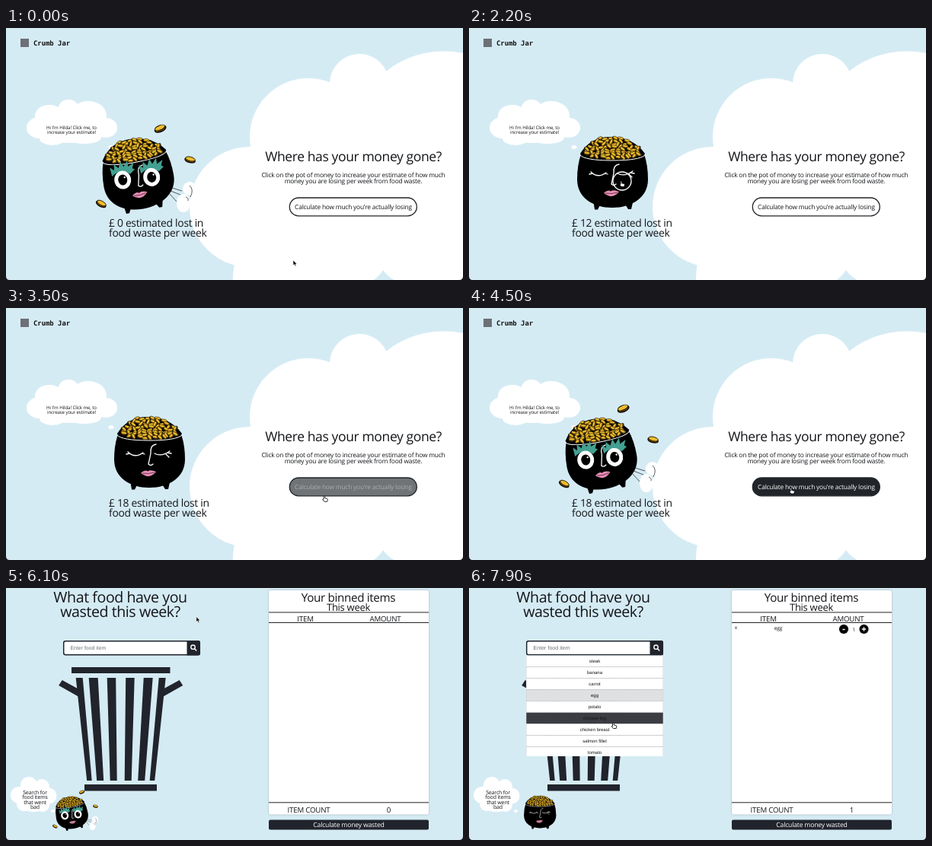
An HTML page that plays this animation: 600x331 px, repeating every 8000 ms.

```html
<!DOCTYPE html>
<html lang="en">
<head>
<meta charset="utf-8">
<title>Food waste estimate</title>
<style>
  html, body { margin: 0; width: 100%; height: 100%; overflow: hidden; background: #d5ebf4; }
  svg { display: block; width: 100vw; height: 100vh; }
  text { font-family: "Open Sans", "Noto Sans", sans-serif; fill: #14161a; letter-spacing: -.022em; text-rendering: geometricPrecision; }
  .mid { text-anchor: middle; }
  .ui text { font-family: "Liberation Sans", Arial, sans-serif; letter-spacing: 0; }
  .ink { fill: #21242c; }
  .white { fill: #fff; }
  .line { fill: none; stroke: #fff; stroke-width: 1.3; stroke-linecap: round; }
  .rule { stroke: #222; stroke-width: 1; }
  .card { filter: drop-shadow(0 .5px 1px #0004); }
</style>
</head>
<body>
<svg viewBox="0 0 600 331" preserveAspectRatio="none">
  <rect width="600" height="331" fill="#d5ebf4"/>

  <g id="home">
    <g class="white">
      <circle cx="397" cy="143" r="77"/>
      <circle cx="464" cy="73" r="39"/>
      <circle cx="575" cy="153.500" r="123"/>
      <circle cx="320" cy="235" r="79"/>
      <circle cx="390" cy="329" r="92"/>
      <path d="M330 190L400 120L600 120V331H509.500Q501 326 495 318Q490 326 482.500 331H330Z"/>
    </g>
    <rect x="19" y="14" width="11" height="11" fill="#6d7075"/>
    <text x="36" y="23.300" style="font:bold 8.9px 'DejaVu Sans Mono',monospace;letter-spacing:0;fill:#111">Crumb Jar</text>
    <g class="white">
      <ellipse cx="86" cy="130" rx="50" ry="21"/>
      <ellipse cx="44" cy="131" rx="17" ry="14"/>
      <ellipse cx="131" cy="131" rx="15" ry="13"/>
      <ellipse cx="57" cy="115" rx="19" ry="14"/>
      <ellipse cx="108" cy="115" rx="24" ry="19"/>
      <ellipse cx="82" cy="105" rx="13" ry="11"/>
      <ellipse cx="61" cy="145" rx="17" ry="9"/>
      <ellipse cx="103" cy="144" rx="22" ry="8"/>
      <ellipse cx="138" cy="156.500" rx="3.500" ry="2.500"/>
    </g>
    <g class="mid" font-size="6.200">
      <text x="86" y="132.500">Hi I'm Hilda! Click me, to</text>
      <text x="86" y="139.300">increase your estimate!</text>
    </g>
    <g font-size="13.900">
      <text id="total" x="135" y="261"></text>
      <text x="135" y="274">food waste per week</text>
    </g>
    <text class="mid" x="456" y="174.700" font-size="17.500">Where has your money gone?</text>
    <g class="mid" font-size="8.350">
      <text x="456" y="196.300">Click on the pot of money to increase your estimate of how much</text>
      <text x="456" y="204">money you are losing per week from food waste.</text>
      <rect id="cta" x="372.300" y="223" width="167" height="23.800" rx="11.900" stroke="#212529" stroke-width="1.300"/>
      <text id="ctaText" x="456" y="237.700">Calculate how much you're actually losing</text>
    </g>
  </g>

  <g id="search">
    <g class="mid" font-size="19.600">
      <text x="150" y="19.300">What food have you</text>
      <text x="150" y="38">wasted this week?</text>
    </g>
    <g id="bin" class="ink">
      <rect x="86" y="104" width="129.500" height="8"/>
      <rect x="103" y="258" width="95" height="8.500"/>
    </g>
    <g class="ui">
      <rect x="75.700" y="69.700" width="178.600" height="18" rx="2.500" fill="#fff" stroke="#21242c" stroke-width="1.500"/>
      <path id="go" d="M237.500 69H252.500Q255 69 255 71.500V86Q255 88.500 252.500 88.500H237.500Z"/>
      <g fill="none" stroke="#fff" stroke-width="1.400"><circle cx="245.500" cy="77.700" r="2.700"/><path d="M247.500 79.700l2.700 2.700"/></g>
      <text id="hint" x="84.500" y="81.300" style="fill:#6c7076">Enter food item</text>
      <clipPath id="listBox"><rect x="75" y="88.500" width="180" height="132.500"/></clipPath>
      <g id="list" class="mid" clip-path="url(#listBox)" font-size="6"></g>
    </g>
    <rect class="white card" x="345" y="3" width="210" height="294.500" rx="2.500"/>
    <g class="mid" font-size="9.700">
      <text x="449.500" y="18" font-size="15.200">Your binned items</text>
      <text x="449.500" y="30.300" font-size="13">This week</text>
      <text x="393" y="43.500">ITEM</text>
      <text x="498" y="43.500">AMOUNT</text>
      <text x="397.500" y="295">ITEM COUNT</text>
      <text id="count" x="502.500" y="295"></text>
    </g>
    <path class="rule" d="M345 32H555M345 45.500H555M345 281.800H555"/>
    <g id="entry" class="mid" font-size="6.600">
      <text x="350.500" y="54">x</text>
      <text x="406" y="55">egg</text>
      <g class="card"><circle cx="492" cy="54" r="6"/><circle cx="518.500" cy="54" r="6"/></g>
      <path d="M490.500 54.500h3M515.800 54h5.400M518.500 51.300v5.400" stroke="#fff" stroke-width="1.300"/>
      <text x="505" y="56.500">1</text>
    </g>
    <rect class="ink" x="345" y="304.500" width="210" height="13" rx="2"/>
    <text class="mid" x="450" y="314" font-size="8.650" style="fill:#fff">Calculate money wasted</text>
    <g class="white">
      <ellipse cx="36" cy="274" rx="24" ry="20"/>
      <circle cx="17" cy="272" r="11"/>
      <circle cx="30" cy="259" r="11"/>
      <circle cx="47" cy="261" r="10"/>
      <circle cx="56" cy="273" r="10.500"/>
      <circle cx="23" cy="284" r="9"/>
      <circle cx="48" cy="285" r="9"/>
      <ellipse cx="61.500" cy="293" rx="2.500" ry="2"/>
    </g>
    <g class="mid" font-size="7">
      <text x="38" y="270.500">Search for</text>
      <text x="38" y="277">food items</text>
      <text x="38" y="283.700">that went</text>
      <text x="38" y="290.300">bad</text>
    </g>
  </g>

  <g id="pot">
    <g id="burst">
      <g class="white">
        <ellipse cx="241" cy="211" rx="9" ry="9"/>
        <ellipse cx="233" cy="230" rx="9" ry="12"/>
      </g>
      <path d="M215 209L231 214M216 214L229 219M215 218L224 228M241 207q6 5 1 15M236 222q4 1 3 5" fill="none" stroke="#333" stroke-width=".8"/>
      <g id="loose"></g>
    </g>
    <g id="body">
      <path d="M163 226l2 12.500h4l4-8zM204 230l5 8h4l3-13z"/>
      <path d="M147 166Q142 180 142 199C142 223 163 236 188 236S235 223 235 199Q235 180 230 166Z"/>
      <path d="M146 165Q160 142 188 143T231 165Q228 174 188 175T146 165Z"/>
      <g id="heap"></g>
      <path class="line" d="M146 167Q152 174 188 174T231 167" style="stroke-width:1"/>
      <path class="line" d="M197 179Q189 180 190 191L187 205q3 3 6 0"/>
      <path d="M177 216.500q6-4.500 9-2q4-2.500 11 .5q-5 6.500-12 6q-5-1-8-4.500z" fill="#e58fb4"/>
      <path d="M179 217q8 1.500 16-1" fill="none" stroke="#5b2340" stroke-width=".8"/>
      <path id="shutL" class="line" d="M160 189q9 9 20 1M162 191l-4 1M179 191l3 1"/>
      <path id="shutR" class="line" d="M195 191q9 5 20-3M212 190l5 1M210 192l4 4"/>
      <circle id="ring" class="line" cx="201" cy="201" r="12"/>
      <g id="eyeL">
        <path d="M155 187l-1-12 5 5 1-8 5 6 4-8 3 7 6-7 0 8 8-4-3 7 3 2-7 5Q168 178 155 187z" fill="#43a091"/>
        <ellipse cx="168" cy="194" rx="8.500" ry="9.500" fill="#000" stroke="#fff" stroke-width="5"/>
        <circle class="white" cx="171" cy="191" r="1.200"/>
      </g>
      <use id="eyeR" href="#eyeL" x="38" y="3"/>
    </g>
  </g>

  <g id="cursor" stroke-linejoin="round">
    <path id="arrow" d="M0 0V6.800L1.600 5.400L2.800 8L4 7.500L2.900 5H5Z" fill="#000" stroke="#fff" stroke-width=".6"/>
    <path id="hand" d="M.8 0Q1.700 0 1.700 1V3L4.500 3.500Q5.500 3.800 5.300 5L4.700 7.500H.9L-1.300 4.800Q-1.200 3.700 0 4.500V1Q0 0 .8 0Z" fill="#fff" stroke="#000" stroke-width=".8"/>
  </g>
  <path d="M0 326Q0 331 5 331H0ZM600 326Q600 331 595 331H600Z" fill="#111"/>
</svg>
<script>
const LOOP = 8000, SWITCH = 4600, OPEN = 6750, PICK = 7400;
const $ = id => document.getElementById(id);
const show = (id, on) => $(id).setAttribute('display', on ? 'inline' : 'none');
const ease = k => { k = Math.min(1, Math.max(0, k)); return k * k * (3 - 2 * k); };

function add(parent, tag, attrs, label) {
  const el = document.createElementNS('http://www.w3.org/2000/svg', tag);
  for (const key in attrs) el.setAttribute(key, attrs[key]);
  if (label) el.textContent = label;
  return parent.appendChild(el);
}

let seed = 11;
const rand = () => (seed = seed * 16807 % 2147483647) / 2147483647;

function coin(parent, x, y, turn, size) {
  const g = add(parent, 'g', { transform: `translate(${x} ${y}) rotate(${turn}) scale(${size})` });
  add(g, 'ellipse', { cy: 1.2, rx: 5, ry: 2.3, fill: '#7a5510', stroke: '#120d02', 'stroke-width': 1.1 });
  add(g, 'ellipse', { rx: 4.7, ry: 2, fill: '#efbd2b', stroke: '#120d02', 'stroke-width': .6 });
}

// Dome of coins, back rows first
for (let y = 145; y < 171; y += 3.6) {
  const half = Math.min(34, 36 * Math.sqrt((y - 141) / 20));
  for (let x = -half; x <= half; x += 6.8)
    coin($('heap'), 189 + x + rand() * 3 - 1.5, y + rand() * 2 - 1 - Math.max(0, y - 164) * (x / 36) ** 2, rand() * 130 - 65, .82);
}
coin($('loose'), 202, 131, -22, 1.5);
coin($('loose'), 242, 172, 14, 1.35);
coin($('loose'), 125.5, 230, 28, 1.35);

// Bin staves and handles, mirrored about the centre
for (const side of [1, -1]) {
  const g = add($('bin'), 'g', { transform: `translate(150.700 0) scale(${side} 1)` });
  for (const [a, b, c, d] of [[-59, -50, -38, -44.5], [-42, -30, -22.5, -31.5], [-18, -6.5, -5, -14]])
    add(g, 'path', { d: `M${a} 118H${b}L${c} 253H${d}Z` });
  add(g, 'path', { d: 'M-77 121L-55 133V143L-81.500 128Z' });
}

const foods = ['steak', 'banana', 'carrot', 'egg', 'potato', 'chicken leg', 'chicken breast', 'salmon fillet', 'tomato'];
const rows = foods.map((name, i) => {
  const y = 88.5 + i * 15;
  const row = add($('list'), 'rect', { x: 75, y, width: 180, height: 15, stroke: '#c4c6c9', 'stroke-width': .7 });
  add($('list'), 'text', { x: 165, y: y + 9.6 }, name);
  return row;
});

const path = [
  [150, 377, 305], [850, 199, 201], [2850, 199, 201], [3420, 417, 246.8], [3700, 417, 246.8],
  [4300, 422, 236.5], [5130, 422, 236.5], [5430, 251, 82], [6050, 250, 38], [6400, 248, 33],
  [6720, 246, 82], [6900, 246, 82], [7350, 175, 141], [7550, 175, 141], [7850, 188.5, 177]
];
function pointer(t) {
  const i = path.findIndex(p => p[0] > t);
  if (i === 0) return path[0].slice(1);
  if (i < 0) return path[path.length - 1].slice(1);
  const [t0, x0, y0] = path[i - 1], [t1, x1, y1] = path[i];
  const k = ease((t - t0) / (t1 - t0));
  return [x0 + (x1 - x0) * k, y0 + (y1 - y0) * k];
}

const clicks = [1000, 1400, 1700, 2000, 2400, 2800];

function drawPot(t, home) {
  const p = t % 1500;
  const burst = p < 200, right = p >= 650 && p < 790, left = p >= 790;
  $('pot').setAttribute('transform', home ? '' : 'translate(93 299) scale(.455) translate(-188 -200)');
  $('body').setAttribute('transform', burst ? 'translate(-14 2) rotate(-10 188 200)' : '');
  show('burst', burst);
  show('eyeL', burst || left);
  show('shutL', !burst && !left);
  show('eyeR', burst);
  show('shutR', !burst);
  show('ring', right);
}

function draw(t) {
  const home = t < SWITCH, open = t >= OPEN, picked = t >= PICK;
  const [x, y] = pointer(t);
  show('home', home);
  show('search', !home);
  drawPot(t, home);

  $('total').textContent = `£ ${3 * clicks.filter(c => t >= c).length} estimated lost in`;
  const k = ease((t - 3412) / 150);
  const mix = (a, b) => Math.round(a + (b - a) * k);
  $('cta').style.fill = `rgb(${mix(255, 33)},${mix(255, 37)},${mix(255, 41)})`;
  $('ctaText').style.fill = `rgb(${mix(20, 255)},${mix(22, 255)},${mix(26, 255)})`;

  const onGo = x > 238 && x < 255 && y > 69 && y < 88.5;
  $('go').style.fill = !home && onGo ? '#3a3d43' : '#21242c';
  $('hint').setAttribute('font-size', open ? 7.1 : 6.9);
  show('list', open);
  const over = Math.floor((y - 88.5) / 15);
  rows.forEach((row, i) => {
    row.style.fill = i === over ? '#3c3d42' : picked && i === 3 ? '#dfe0e1' : '#fff';
  });
  show('entry', picked);
  $('count').textContent = picked ? 1 : 0;

  const hand = home
    ? Math.hypot(x - 188, y - 198) < 46 || (x > 372 && y > 223 && y < 247)
    : onGo || (open && y >= 88.5);
  $('cursor').setAttribute('transform', `translate(${x} ${y})`);
  show('hand', hand);
  show('arrow', !hand);
}

function tick() {
  draw(performance.now() % LOOP);
  requestAnimationFrame(tick);
}
tick();
</script>
</body>
</html>
```
